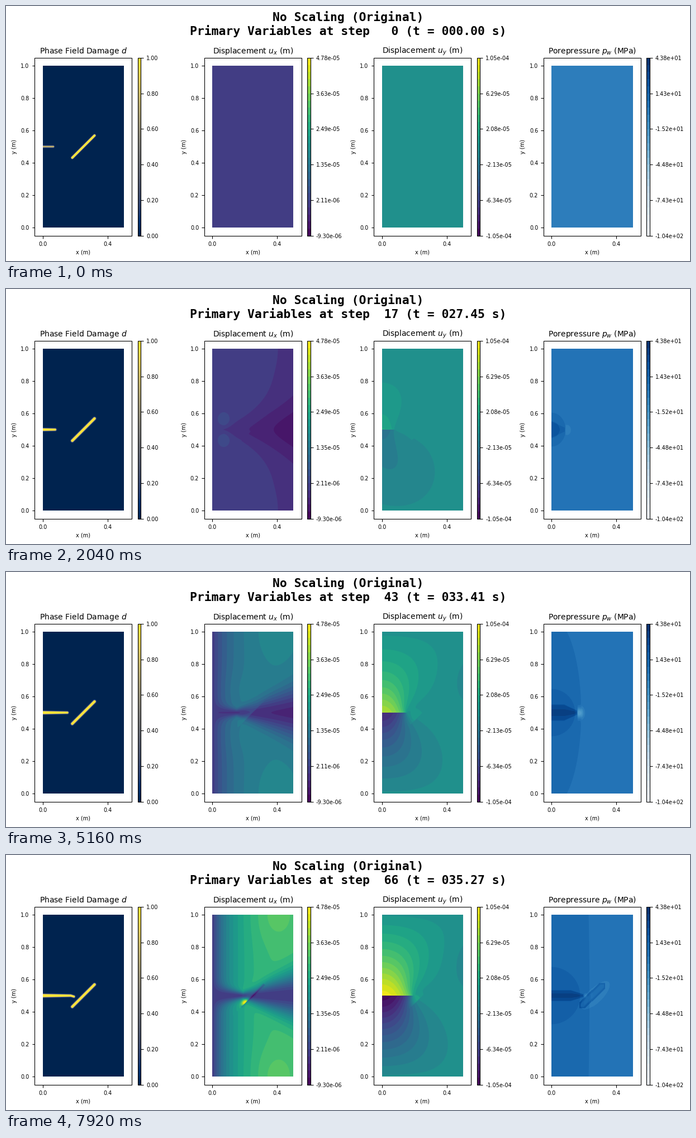
Write a matplotlib script that moves like this. It is 1224x457 px and loops after 8 s.

```python
import numpy as np
import matplotlib
import matplotlib.pyplot as plt
from matplotlib.animation import FuncAnimation
from matplotlib.patches import Rectangle

W, H, DPI = 1224, 457, 100
TICK_MS, TICKS_PER_STEP, TICKS = 40, 3, 200
STEPS = 67
PX = 290                      # pixels per metre
PITCH = 303.5                 # distance between panels
TOP, BOTTOM = 92.8, 411.8     # axes box

plt.rcParams["font.family"] = "DejaVu Sans"
plt.rcParams["font.size"] = 7

# Specimen grid: x to the right, y measured from mid height
x, y = np.meshgrid((np.arange(145) + 0.5) / PX, 0.5 - (np.arange(290) + 0.5) / PX)
ay = np.abs(y)
along = (x - 0.25 + y) / np.sqrt(2)     # position along the inclined fault
across = (y - x + 0.25) / np.sqrt(2)    # signed distance to it
above = np.clip(0.5 + across * PX, 0, 1)


def ramp(step, start, end):
    return min(max((step - start) / (end - start), 0), 1)


def load(step):
    return ramp(step, 0, 8)


def growth(step):
    """Crack advance from 0 to 1, slowing down towards the fault."""
    return 1 - (1 - ramp(step, 14, 66)) ** 1.4


def crack_length(step):
    return 0.064 + 0.002 * load(step) + 0.125 * growth(step)


def clock(step):
    return np.interp(step, [0, 8, 14, 20, 26, 36, 50, 59, 66],
                     [0, 14.76, 25.6, 29.3, 30.64, 32.62, 34.19, 35.06, 35.27])


def bump(cx, cy, rx, ry, yy=y):
    return np.exp(-((x - cx) / rx) ** 2 - ((yy - cy) / ry) ** 2)


def inside(r, sharp=20):
    return np.clip((1 - r) * sharp + 0.5, 0, 1)


def damage(step):
    tip, early = crack_length(step), load(step)
    soft = 1.1 + 0.4 * early

    def line(dist, half):
        return np.exp(-(np.maximum(dist * PX - half, 0) / soft) ** 2)

    bend = -0.3 * np.clip(x - 0.172, 0, 0.02)
    root = 0.8 + 0.4 * early + 0.6 * growth(step)
    half = root + (0.8 - root) * np.clip(x / tip, 0, 1)
    notch = line(np.hypot(np.maximum(x - tip, 0), y - bend), half)
    fault = line(np.hypot(np.maximum(np.abs(along) - 0.097, 0), across), 1.2)
    return np.maximum((0.75 + 0.25 * early) * notch, fault)


def disp_x(step):
    tip, early, g = crack_length(step), load(step), growth(step)
    rise = 0.03 * early + 0.51 * g ** 1.6
    dx = x - tip
    width = 0.02 + np.where(dx > 0, 0.4 * dx, -0.25 * dx)
    fan = 1 - np.exp(-(ay / width) ** 2)
    u = 0.163 + rise * (1 - np.exp(-x / 0.12)) * fan
    u -= 0.11 * early * (1 - g * g) * x / 0.5 * (1 - 0.5 * fan)
    # lobes above and below the tip
    cy = 0.05 + 0.09 * min(2 * g, 1)
    u += 0.06 * early * (1 - g) * bump(0.9 * tip, cy, 0.7 * cy, 0.8 * cy, ay)
    u += 0.1 * rise * bump(0.38, 0.5, 0.12, 0.17, ay)
    # slip along the fault
    u += 0.1 * g * above * np.exp(-(along / 0.09) ** 2 - (across / 0.05) ** 2)
    hot = np.exp(-((along + 0.062) / 0.026) ** 2 - (across / 0.018) ** 2)
    u += 0.5 * g ** 8 * above * hot
    seam = np.exp(-(across / 0.007) ** 2) * inside(np.abs(along) / 0.1)
    return u - 0.13 * ramp(step, 57, 66) * seam


def disp_y(step):
    early, g = load(step), growth(step)
    tip = max(crack_length(step), 0.08)
    # opening of a pressurised crack, held at the top and bottom edges
    z = x + 1j * ay
    root = np.sqrt(z * z - tip ** 2)
    v = 1.4 * (root - z).imag - ay * (z / root - 1).real
    v *= np.sign(y) * (0.04 * early + 0.445 * g ** 0.7) / (1.4 * tip)
    v *= (1 - (ay / 0.52) ** 2.5) / (1 + (x / 0.42) ** 4)
    v -= 0.04 * early * (1 - g) * bump(0.1, -0.25, 0.25, 0.25)
    v -= 0.05 * np.sqrt(g) * bump(0.55, 0.2, 0.12, 0.17)
    v += 0.1 * g * above * bump(0.21, -0.03, 0.045, 0.045)
    return 0.5 + v


def pressure(step):
    tip, early, g = crack_length(step), load(step), growth(step)
    p = np.full_like(x, 0.7 + 0.04 * ramp(step, 0, 4))
    # diffusion fronts
    a = 0.001 + early * (0.074 + 0.16 * g)
    b = 0.065 + 0.5 * g + 1.8 * g ** 6
    p += 0.04 * early * inside(np.hypot(x / a, y / b))
    p += 0.04 * inside(np.hypot(x, y) / (0.001 + 0.176 * np.sqrt(g)))
    # fluid filled cone behind the tip
    grow, late = ramp(step, 14, 22), ramp(step, 48, 62)
    reach = tip + 0.008
    half = (0.049 - 0.016 * late) * np.clip(0.25 + 0.75 * (reach - x) / 0.08, 0.05, 1)
    cone = grow * inside(ay / half, 6) * np.clip((reach - x) * PX, 0, 1)
    p += cone * (0.08 + 0.03 * inside(ay / (0.45 * half), 3))
    # suction ahead of the tip
    wide = 0.024 - 0.013 * late
    ahead = np.clip((x - reach) * PX, 0, 1)
    pull = 0.22 * ramp(step, 14, 26) * (1 - 0.6 * late)
    p -= pull * ahead * bump(reach + 0.012, -0.002, wide, 1.3 * wide)
    # fault: short streak, then a light lens, then a dark core
    streak = ramp(step, 44, 49) - ramp(step, 53, 57)
    p -= 0.04 * streak * inside(np.hypot((along - 0.05) / 0.045, (across + 0.012) / 0.006), 4)
    lens = inside(np.hypot((along - 0.015) / 0.115, (across + 0.012) / 0.045))
    p -= 0.04 * ramp(step, 51, 58) * lens
    far = np.maximum(np.abs(along) - 0.085, 0) + np.abs(across)
    core = 0.1 * inside(far / 0.025, 8) - 0.04 * inside(far / 0.014, 6)
    return p + ramp(step, 60, 66) * core


def shade(field, cmap, bands):
    """Filled contour bands with softened edges."""
    q = np.clip(field * bands, 0.5, bands - 0.5)
    gy, gx = np.gradient(q)
    edge = np.rint(q)
    q = edge + np.clip((q - edge) / (np.hypot(gx, gy) + 1e-6), -0.5, 0.5)
    return cmap(q / bands, bytes=True)[..., :3]


# title, colour map, bands, field, label format, colour range
PANELS = [
    ("Phase Field Damage $d$", "cividis", 100, damage, ".2f", (0, 1)),
    ("Displacement $u_x$ (m)", "viridis", 25, disp_x, ".2e", (-9.30e-6, 4.775e-5)),
    ("Displacement $u_y$ (m)", "viridis", 25, disp_y, ".2e", (-1.0545e-4, 1.0495e-4)),
    ("Porepressure $p_w$ (MPa)", "Blues", 25, pressure, ".2e", (-103.8, 43.8)),
]
CMAPS = [matplotlib.colormaps[p[1]] for p in PANELS]

fig = plt.figure(figsize=(W / DPI, H / DPI), dpi=DPI, facecolor="white")
ax = fig.add_axes([0, 0, 1, 1])


def picture(data, left, right, top, bottom):
    return ax.imshow(data, extent=(left, right, bottom, top), aspect="auto",
                     interpolation="nearest", zorder=1)


def frame(left, right):
    ax.add_patch(Rectangle((left, TOP), right - left, BOTTOM - TOP,
                           fill=False, ec="black", lw=0.8, zorder=3))


def build_panel(i):
    title, _, bands, _, fmt, limits = PANELS[i]
    off = i * PITCH
    left, right = off + 51.4, off + 225.4
    zero, mid = off + 65.9, off + 138.4
    img = picture(np.zeros((290, 145, 3), np.uint8), zero, zero + 145, 107, 397)
    frame(left, right)
    style = dict(colors="black", lw=0.8, zorder=3)

    xt = [zero, zero + 116]
    ax.vlines(xt, BOTTOM, BOTTOM + 4.9, **style)
    for px, text in zip(xt, ("0.0", "0.4")):
        ax.text(px, BOTTOM + 9.7, text, ha="center", va="top")
    yt = [397.3 - 58 * k for k in range(6)]
    ax.hlines(yt, left - 4.9, left, **style)
    for k, py in enumerate(yt):
        ax.text(left - 9.7, py, f"{k / 5:.1f}", ha="right", va="center_baseline")

    ax.text(mid, TOP - 8.3, title, ha="center", va="baseline", fontsize=10)
    ax.text(mid, 442, "x (m)", ha="center", va="center")
    ax.text(off + 15, 252, "y (m)", ha="center", va="center", rotation=90)

    bar_l, bar_r = off + 235.8, off + 241.4
    ramp_up = (np.arange(bands)[::-1, None] + 0.5) / bands
    picture(CMAPS[i](ramp_up), bar_l, bar_r, TOP, BOTTOM)
    frame(bar_l, bar_r)
    bt = np.linspace(BOTTOM, TOP, 6)
    ax.hlines(bt, bar_r, bar_r + 4.9, **style)
    for py, value in zip(bt, np.linspace(*limits, 6)):
        ax.text(bar_r + 9.7, py, format(value, fmt), ha="left", va="center_baseline")
    return img


images = [build_panel(i) for i in range(len(PANELS))]
head = dict(ha="center", va="baseline", fontsize=15.4, family="DejaVu Sans Mono",
            weight="bold")
ax.text(W / 2, 27, "No Scaling (Original)", **head)
heading = ax.text(W / 2, 52, "", **head)
ax.set_xlim(0, W)
ax.set_ylim(H, 0)
ax.axis("off")

shots = [[shade(field(step), cmap, bands)
          for (_, _, bands, field, _, _), cmap in zip(PANELS, CMAPS)]
         for step in range(STEPS)]


def update(tick):
    step = tick // TICKS_PER_STEP
    heading.set_text(f"Primary Variables at step {step:3d} (t = {clock(step):06.2f} s)")
    for img, data in zip(images, shots[step]):
        img.set_data(data)
    return [heading, *images]


anim = FuncAnimation(fig, update, frames=TICKS, interval=TICK_MS,
                     repeat=True, repeat_delay=0, blit=False)
plt.show()
```
